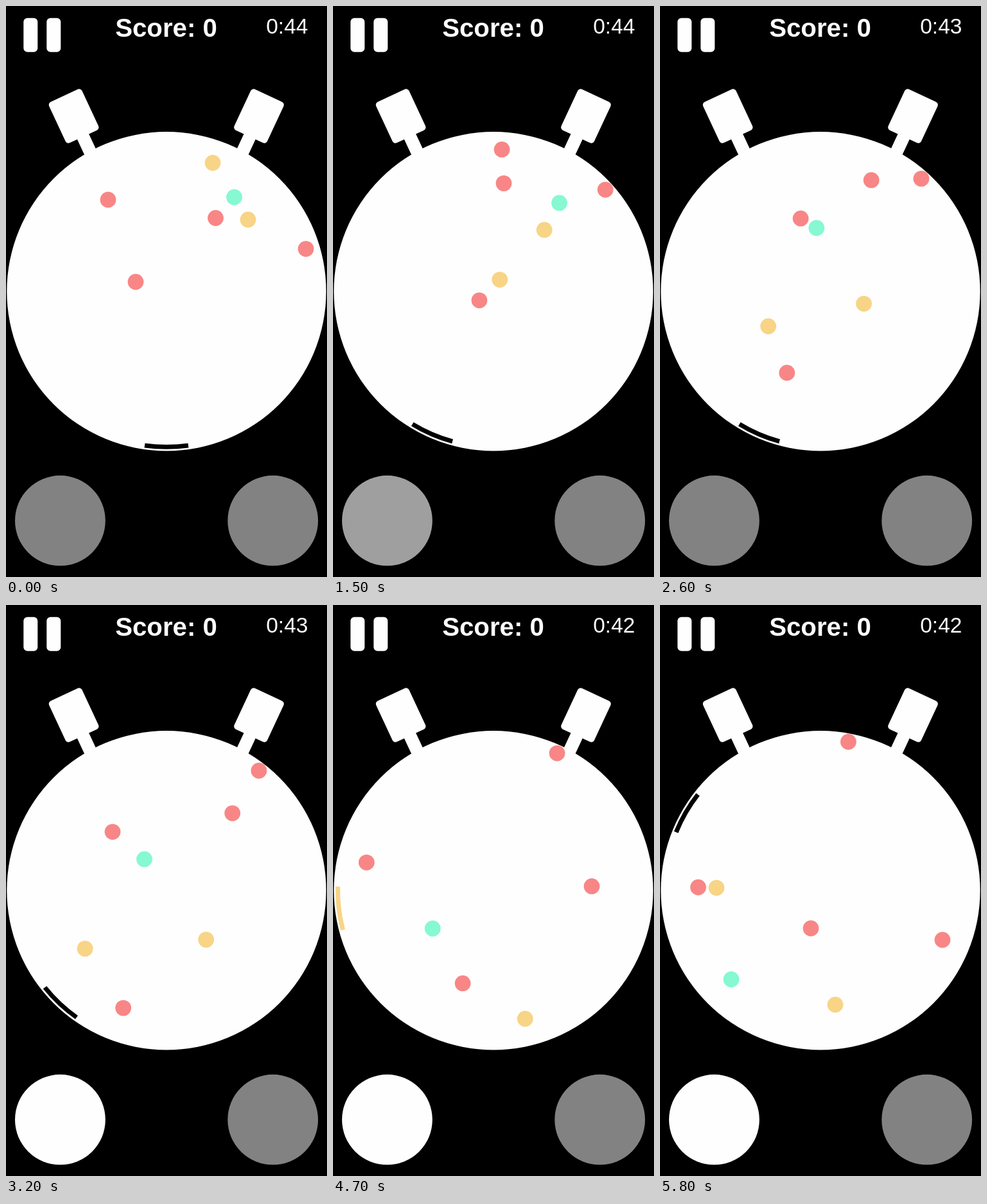
These frames come from a looping animation (500 by 890 pixels, 5.9 s). An HTML page with a canvas:

```html
<!DOCTYPE html>
<html lang="en">
<head>
<meta charset="utf-8">
<title>Stopwatch game</title>
<style>
  html, body { margin: 0; width: 100%; height: 100%; overflow: hidden; background: #000; }
  canvas { display: block; width: 500px; height: 890px; }
</style>
</head>
<body>
<canvas id="stage" width="500" height="890"></canvas>
<script>
const ctx = document.getElementById('stage').getContext('2d');
const LOOP = 5900, CX = 250, CY = 444.8, RAD = Math.PI / 180;
const WHITE = '#fefefe', RED = '#f88686', YELLOW = '#f8d486', TEAL = '#86f8d2';
const CATCH = 48, SHOT = 56, END = 65;

// Each ball runs at an even pace from hit to hit.
const balls = [
  { color: RED, hits: [[159, 302], [254, 209.5], [271, 236], [304, 214.5], [440, 522]] },
  { color: RED, hits: [[326.5, 330.5], [266, 358], [266, 253], [222, 330], [15, 417], [59.5, 440]] },
  { color: RED, hits: [[202, 430], [249, 380], [172, 668], [235, 504]] },
  { color: YELLOW, hits: [[322, 244.5], [341.5, 227], [296, 677], [273, 623]] },
  { color: TEAL, hits: [[355.5, 298], [425, 281], [243.5, 346], [111, 583.5]] },
  { color: YELLOW, to: CATCH, hits: [[377, 333], [64.5, 582.4]] },
  { color: YELLOW, from: SHOT, hits: [[13, 439], [88, 440.8]] }
];

// The left button's holds, in ticks; they drive both its glow and the paddle.
const holds = [[8.7, 15.7], [33, 41], [44, Infinity]];
const FADE = 3;

const clamp = (v, lo, hi) => Math.min(hi, Math.max(lo, v));

// Game ticks: two per update at a slow pace, later one every 100 ms.
function tickAt(ms) {
  const n = Math.floor(ms / 100);
  return n < 27 ? 2 * Math.floor(n / 1.58) : n + 7;
}

// The point at share u of a polyline's length.
function along(points, u) {
  const legs = points.slice(1).map(([x, y], i) => Math.hypot(x - points[i][0], y - points[i][1]));
  let rest = u * legs.reduce((a, b) => a + b), i = 0;
  while (i < legs.length - 1 && rest > legs[i]) rest -= legs[i++];
  const [x0, y0] = points[i], [x1, y1] = points[i + 1], k = rest / legs[i];
  return [x0 + (x1 - x0) * k, y0 + (y1 - y0) * k];
}

// One ball rolls along the rim: fast until it is hit, then slowly speeding up.
function rimBall(t) {
  const a = (58 - 5.73 * Math.exp(.0325 * t) + 1.73 * Math.max(0, 12 - t)) * RAD;
  const r = Math.min(235.6, 227 + 1.5 * t);
  return [CX + r * Math.sin(a), CY - r * Math.cos(a)];
}

function disc(x, y, r, color) {
  ctx.fillStyle = color;
  ctx.beginPath();
  ctx.arc(x, y, r, 0, 2 * Math.PI);
  ctx.fill();
}

function box(x, y, w, h, r) {
  ctx.beginPath();
  ctx.roundRect(x, y, w, h, r);
  ctx.fill();
}

function text(str, x, y, font, align) {
  ctx.font = font + ' "Liberation Sans", Arial, sans-serif';
  ctx.textAlign = align;
  ctx.fillText(str, x, y);
}

function knob(side) {
  ctx.save();
  ctx.translate(249.8, 171.6);
  ctx.scale(side, 1);
  ctx.translate(144.2, 0);
  ctx.rotate(25 * RAD);
  box(-28.3, -35.2, 56.6, 70.4, 5);
  ctx.fillRect(-9.5, 30, 20, 42);
  ctx.restore();
}

function paddle(t) {
  const moves = holds.reduce((sum, [on, off]) => sum + clamp(t - on, 0, off - on), 0);
  const mid = (90 + moves * 10 / 3) * RAD, half = 8.05 * RAD;
  ctx.strokeStyle = t >= CATCH && t < SHOT ? YELLOW : '#000';
  ctx.lineWidth = 7;
  ctx.beginPath();
  ctx.arc(CX, CY, 242.5, mid - half, mid + half);
  ctx.stroke();
}

function glow(t) {
  const fades = holds.map(([on, off]) => Math.min((t - on) / FADE, 1 - (t - off) / FADE));
  return clamp(Math.max(...fades), 0, 1);
}

function draw(ms) {
  const t = tickAt(ms);
  ctx.fillStyle = '#000';
  ctx.fillRect(0, 0, 500, 890);

  ctx.fillStyle = WHITE;
  box(27.3, 18.7, 22, 53, 6);
  box(63.3, 18.7, 22, 53, 6);
  text('Score: 0', 249.5, 47.5, 'bold 40.2px', 'center');
  text('0:' + (44 - Math.floor((t + 10) / 30)), 405.2, 42.5, '33.5px', 'left');
  knob(-1);
  knob(1);
  disc(CX, CY, 248.7, WHITE);

  paddle(t);
  for (const { color, hits, from = 0, to = END } of balls) {
    if (t >= from && (t < to || to === END)) {
      disc(...along(hits, (t - from) / (to - from)), 12.4, color);
    }
  }
  disc(...rimBall(t), 12.4, RED);

  const lit = Math.round(130 + 124 * glow(t));
  disc(84.4, 802.2, 70.4, `rgb(${lit},${lit},${lit})`);
  disc(415.7, 802.2, 70.4, '#828282');
}

const start = performance.now();
function loop() {
  draw((performance.now() - start) % LOOP);
  requestAnimationFrame(loop);
}
loop();
</script>
</body>
</html>
```
